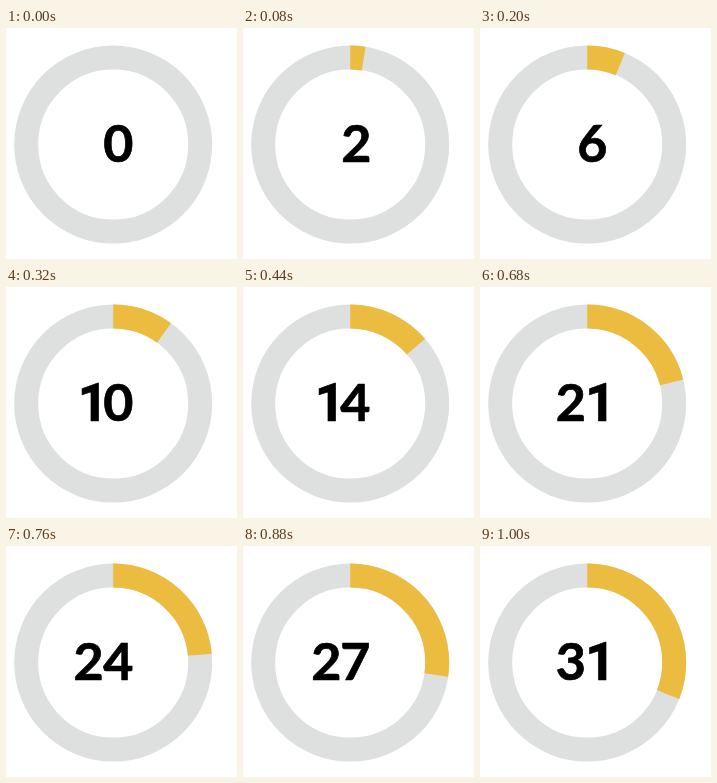
An HTML page with a canvas for the animation above (5 s loop, 231 by 231 pixels).

```html
<!DOCTYPE html>
<html lang="en">
<head>
<meta charset="utf-8">
<title>Progress ring</title>
<style>
  html, body { margin: 0; width: 100%; height: 100%; overflow: hidden; background: #fff; }
  canvas { display: block; width: 100vw; height: 100vh; }
</style>
</head>
<body>
<canvas id="stage"></canvas>
<script>
const SIZE = 231, LOOP = 5000, STEP = 40, GROW = 1000, GOAL = 31;
const RING = { x: 107.2, y: 116.6, radius: 87, width: 24 };
const BASELINE = 133.7, RIGHT = 126.7, OUTLINE = 0.7;

const canvas = document.getElementById('stage');
const ctx = canvas.getContext('2d');
const scale = window.devicePixelRatio || 1;
canvas.width = canvas.height = Math.round(SIZE * scale);

// The plain "1" without a foot comes from a second face.
const fontOf = d => d === '1'
  ? '700 53px Roboto, sans-serif'
  : '700 52px Lato, sans-serif';

// Optical space beside a digit.
const bearing = d => ({ 1: 3.8, 4: 0 })[d] ?? 1.2;

function drawArc(share, color) {
  const start = -Math.PI / 2;
  ctx.beginPath();
  ctx.arc(RING.x, RING.y, RING.radius, start, start + share * 2 * Math.PI);
  ctx.lineWidth = RING.width;
  ctx.strokeStyle = color;
  ctx.stroke();
}

// Digits are set from right to left, spaced by their visible edges.
function drawNumber(value) {
  const digits = [...String(value)].reverse();
  let edge = RIGHT;
  ctx.fillStyle = ctx.strokeStyle = '#000';
  ctx.lineWidth = OUTLINE;
  ctx.textAlign = 'left';
  digits.forEach((d, i) => {
    ctx.font = fontOf(d);
    const box = ctx.measureText(d);
    if (i) edge -= bearing(d) + bearing(digits[i - 1]);
    const x = edge - OUTLINE / 2 - box.actualBoundingBoxRight;
    ctx.fillText(d, x, BASELINE);
    ctx.strokeText(d, x, BASELINE);
    edge = x - box.actualBoundingBoxLeft - OUTLINE / 2;
  });
}

function draw(time) {
  const stepped = Math.floor((time % LOOP) / STEP) * STEP;
  const value = GOAL * Math.min(stepped / GROW, 1);
  ctx.setTransform(scale, 0, 0, scale, 0, 0);
  ctx.fillStyle = '#fff';
  ctx.fillRect(0, 0, SIZE, SIZE);
  drawArc(1, '#dde0df');
  if (value > 0) drawArc(value / 100, '#ebbc3f');
  drawNumber(Math.round(value));
}

let origin = null;
function tick(now) {
  origin ??= now;
  draw(Math.max(0, now - origin));
  requestAnimationFrame(tick);
}
draw(0);
requestAnimationFrame(tick);
</script>
</body>
</html>
```
